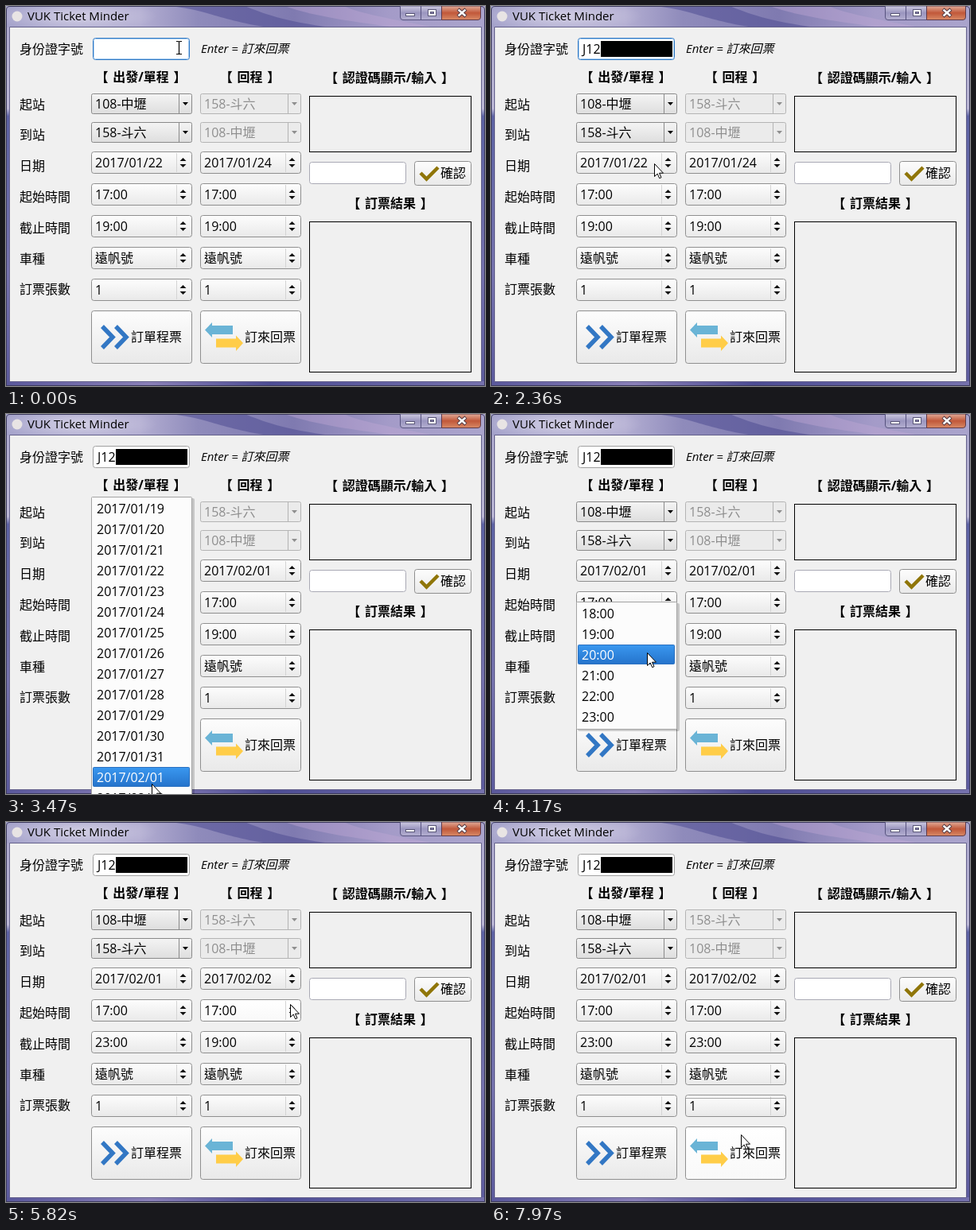
Write an HTML page that moves like this. It is 602x478 px and loops after 7990 ms.

```html
<!DOCTYPE html>
<html lang="zh-TW">
<head>
<meta charset="utf-8">
<title>VUK Ticket Minder</title>
<style>
html, body { margin: 0; width: 100%; height: 100%; overflow: hidden; background: #f0f0f0; }
svg { display: block; width: 602px; height: 478px; }
text { font: 16px "Open Sans", "Noto Sans", "Noto Sans CJK TC", "Noto Sans CJK JP", "Noto Sans CJK SC", "Noto Sans CJK", sans-serif; white-space: pre; }
.head { font-weight: 700; text-anchor: middle; word-spacing: 1.5px; }
.title { font-size: 15px; }
.hint { font-size: 15px; font-style: italic; }
</style>
</head>
<body>
<svg viewBox="0 0 602 478">
  <defs>
    <linearGradient id="bar">
      <stop offset="0" stop-color="#a5a3cb"/><stop offset=".28" stop-color="#b3aed2"/>
      <stop offset=".4" stop-color="#8f8bbb"/><stop offset=".6" stop-color="#7f7ab0"/>
      <stop offset=".8" stop-color="#a49bc8"/><stop offset="1" stop-color="#aaa4cc"/>
    </linearGradient>
    <linearGradient id="edge" x2="0" y2="1">
      <stop offset="0" stop-color="#aaa6cc"/><stop offset=".27" stop-color="#bcb8d6"/>
      <stop offset=".29" stop-color="#5d63a4"/><stop offset=".7" stop-color="#7673ae"/>
      <stop offset="1" stop-color="#5c5b9e"/>
    </linearGradient>
    <linearGradient id="foot">
      <stop offset="0" stop-color="#5a589c"/><stop offset=".3" stop-color="#8a80b8"/>
      <stop offset=".55" stop-color="#4c4c94"/><stop offset="1" stop-color="#7672ae"/>
    </linearGradient>
    <radialGradient id="haze"><stop offset="0" stop-color="#dcd9ea" stop-opacity=".8"/><stop offset="1" stop-color="#dcd9ea" stop-opacity="0"/></radialGradient>
    <linearGradient id="face" x2="0" y2="1"><stop offset="0" stop-color="#fdfdfd"/><stop offset="1" stop-color="#e9e9e9"/></linearGradient>
    <linearGradient id="hover" x2="0" y2="1"><stop offset="0" stop-color="#fff"/><stop offset="1" stop-color="#f9f9f9"/></linearGradient>
    <linearGradient id="drop" x2="0" y2="1"><stop offset="0" stop-color="#f4f4f4"/><stop offset="1" stop-color="#dedede"/></linearGradient>
    <linearGradient id="pick" x2="0" y2="1"><stop offset="0" stop-color="#3a98f0"/><stop offset="1" stop-color="#2573cb"/></linearGradient>
    <linearGradient id="cap" x2="0" y2="1"><stop offset="0" stop-color="#cfcbe2"/><stop offset=".5" stop-color="#9a95bf"/><stop offset="1" stop-color="#b4afd0"/></linearGradient>
    <linearGradient id="close" x2="0" y2="1"><stop offset="0" stop-color="#e2ab98"/><stop offset=".5" stop-color="#c1583a"/><stop offset="1" stop-color="#d88a66"/></linearGradient>
  </defs>
  <g id="base"></g>
  <g id="live"></g>
</svg>
<script>
const LOOP = 7990;
const LEFT = 107, RIGHT = 244;
const TRAIN = '遠帆號';
const $ = id => document.getElementById(id);

const text = (x, y, s, cls = '', fill = '#000') =>
  `<text x="${x}" y="${y + 6}" class="${cls}" fill="${fill}">${s}</text>`;
const box = (x, y, w, h, fill, stroke = 'none', r = 0) => {
  const o = stroke === 'none' ? 0 : .5;
  return `<rect x="${x + o}" y="${y + o}" width="${w - 2 * o}" height="${h - 2 * o}" rx="${r}" fill="${fill}" stroke="${stroke}"/>`;
};
const path = (d, fill, extra = '') => `<path d="${d}" fill="${fill}" ${extra}/>`;
const line = (d, color, w = 1) => path(d, 'none', `stroke="${color}" stroke-width="${w}"`);

// drop-down with a square arrow cell
function station(x, y, s, off) {
  const ink = off ? '#8e8e8e' : '#000', rim = off ? '#b4b4b4' : '#8a8a8a';
  return box(x, y, 127, 26, off ? '#ebebeb' : 'url(#drop)', rim, 2) +
    line(`M${x + 110.5} ${y + 1}v24`, rim) +
    path(`M${x + 115} ${y + 11}h7l-3.5 4z`, ink) + text(x + 5, y + 13, s, '', ink);
}

// drop-down with up and down arrows
function combo(x, y, s, hot) {
  return box(x, y, 127, 28, hot ? 'url(#hover)' : 'url(#face)', '#8f8f8f', 3) +
    line(`M${x + 107.5} ${y + 2}v24`, '#d4d4d4') +
    path(`M${x + 111.5} ${y + 12}h8l-4 -4zM${x + 111.5} ${y + 16}h8l-4 4z`, '#111') +
    text(x + 5, y + 14, s);
}

function button(x, s, icon, hot) {
  return box(x, 383, 127, 67, hot ? 'url(#hover)' : 'url(#face)', '#8f8f8f', 3) + icon + text(x + (x === LEFT ? 50 : 56), 416, s);
}

function frame() {
  return box(0, 0, 602, 478, 'url(#edge)') + box(0, 0, 602, 27, 'url(#bar)') + box(0, 472, 602, 6, 'url(#foot)') +
    path('M205 0C250 4 270 18 330 27H410C350 20 320 8 300 0z', '#4a4890', 'opacity=".5"') +
    path('M350 0C390 14 440 20 490 27H540C480 16 440 8 425 0z', '#c0a9d4', 'opacity=".4"') +
    '<ellipse cx="90" cy="13" rx="100" ry="20" fill="url(#haze)"/>' +
    line('M.5 478V5Q.5 .5 5 .5H597Q601.5 .5 601.5 5V477.5H0', '#3d3b5e') +
    line('M4.5 26.5H597.5V472.5H4.5z', '#65628c') + box(5, 27, 592, 445, '#f0f0f0') +
    '<circle cx="14" cy="13" r="6.5" fill="#e8e4e4"/>' + text(27, 12, 'VUK Ticket Minder', 'title') +
    path('M495.5 0V14Q495.5 17.5 499 17.5H547.5V0z', 'url(#cap)', 'stroke="#57537f"') + line('M521.5 0V17', '#57537f') +
    path('M547.5 0V17.5H593Q596.5 17.5 596.5 14V0z', 'url(#close)', 'stroke="#5f3a4a"') +
    box(502, 9, 12, 4, '#fff', '#5b5878') + box(530, 4, 11, 9, '#fff', '#5b5878') + box(533, 7, 5, 3, '#8984b0', '#5b5878') +
    line('M568 4L578 13M578 4L568 13', '#5b4048', 4.5) + line('M568.6 4.6L577.4 12.4M577.4 4.6L568.6 12.4', '#fff', 2.6);
}

function form() {
  const labels = ['起站', '到站', '日期', '起始時間', '截止時間', '車種', '訂票張數'];
  return text(17, 54, '身份證字號') + labels.map((s, i) => text(17, Math.round(123.6 + i * 38.8), s)).join('') +
    text(245, 53, 'Enter = 訂來回票', 'hint') +
    text(169.5, 89, '【 出發/單程 】', 'head') + text(306.5, 89, '【 回程 】', 'head') +
    text(482, 90, '【 認證碼顯示/輸入 】', 'head') + text(483, 248, '【 訂票結果 】', 'head') +
    station(LEFT, 110, '108-中壢') + station(LEFT, 146, '158-斗六') +
    station(RIGHT, 110, '158-斗六', true) + station(RIGHT, 146, '108-中壢', true) +
    [LEFT, RIGHT].map(x => combo(x, 303, TRAIN) + combo(x, 343, '1')).join('') +
    combo(LEFT, 223, '17:00') +
    box(381, 113, 204, 71, 'none', '#000') + box(381, 271, 204, 190, 'none', '#000') +
    box(381, 196, 122, 28, '#fff', '#a9a9b4', 3) + box(513, 195, 72, 31, 'url(#face)', '#8f8f8f', 3) +
    line('M521 210L528.5 217.5L543 203', '#8f7508', 4.5) + text(546, 210, '確認') +
    button(LEFT, '訂單程票', line('M121 403L134 416.5L121 430M138 403L151 416.5L138 430', '#3277c4', 5.5));
}

const swap = path('M250 407.5L259 398V402H285V413H259V417z', '#6ab4d6') +
  path('M298 424L289 434V429.500H264V418.500H289V414.500z', '#ffcd48');

const day = i => '2017/' + (i < 13 ? '01/' + (19 + i) : '02/0' + (i - 12));
const hour = i => 18 + i + ':00';

// pointer stops: time, x, y
const stops = [
  [0, 217, 52], [1990, 219, 48], [2360, 205, 198], [2460, 205, 198], [2720, 199, 354], [2860, 199, 355],
  [3450, 183, 465], [3610, 183, 466], [3980, 200, 277], [4080, 200, 278], [4390, 180, 384], [4460, 180, 384],
  [4780, 282, 326], [5040, 305, 200], [5170, 308, 203], [5390, 308, 203], [5560, 312, 224], [5630, 313, 225],
  [5820, 357, 229], [6330, 357, 229], [6490, 352, 272], [6570, 352, 274], [6750, 352, 274], [7120, 335, 380],
  [7890, 335, 380], [7970, 314, 393]
];
// open lists: from, to, x, top, rows, first row number, label
const lists = [
  [2400, 3560, LEFT, 104, 17, 0, day], [4020, 4440, LEFT, 236, 6, 0, hour],
  [5080, 5610, RIGHT, 182, 4, 13, day], [6520, 7520, RIGHT, 236, 6, 0, hour]
];
const clicks = [[240, 390], [2370, 2460], [3490, 3570], [3990, 4080], [5060, 5150], [5580, 5640], [6490, 6560]];
const within = (t, a, b) => t >= a && t < b;

function pointer(t) {
  const n = stops.findIndex(s => s[0] > t);
  if (n < 0) return stops[stops.length - 1].slice(1);
  const [t0, x0, y0] = stops[n - 1], [t1, x1, y1] = stops[n];
  if (t1 === 1990) return [x0, y0];
  const u = (t - t0) / (t1 - t0), e = u * u * (3 - 2 * u);
  return [x0 + (x1 - x0) * e, y0 + (y1 - y0) * e].map(Math.round);
}

const rowAt = (top, rows, y) => Math.max(0, Math.min(rows - 1, Math.floor((y - top - 2) / 26)));

function popup([, , x, top, rows, first, label], y) {
  const on = rowAt(top, rows, y), h = rows * 26 + 5;
  let s = box(x + 2, top + 2, 128, h, '#000', 'none', 2).replace('/>', ' opacity=".18"/>') +
    box(x, top, 127, h, '#fcfcfc', '#a3a3a3', 1);
  for (let i = 0; i < rows; i++) {
    const mid = top + 15 + i * 26;
    if (i === on) s += box(x + 2, mid - 13, 122, 25, 'url(#pick)', '#2a70c0', 1);
    s += text(x + 7, mid, label(first + i), '', i === on ? '#fff' : '#000');
  }
  return s;
}

function mouse(t, x, y) {
  if (within(t, 620, 1990)) return '';
  const press = clicks.some(c => within(t, ...c))
    ? `<circle cx="${x - 1}" cy="${y}" r="12" fill="#ff0" opacity=".47"/>` : '';
  if (y < 70) return press + line(`M${x - 3} ${y - 7.5}h2.500q1 0 1 1q0 -1 1 -1h2.500M${x + .5} ${y - 7}v15M${x - 3} ${y + 8.500}h2.500q1 0 1 -1q0 1 1 1h2.500`, '#000', 1.2);
  return press + path('M.5 .5V16.500L4.200 13L6.700 18.700L9 17.700L6.500 12.200H11.500z', '#fff',
    `stroke="#000" transform="translate(${x} ${y})"`);
}

function draw(t) {
  const [x, y] = pointer(t);
  const open = lists.find(l => within(t, l[0], l[1]));
  const back = t < 2760 ? 5 : t < 3560 ? Math.max(5, rowAt(104, 17, y)) : t < 5610 ? 13 : 14;
  const typed = t < 620 ? '' : t < 970 ? 'J' : t < 1065 ? 'J1' : 'J12';
  const focus = t < 2370;
  let s = box(109, 40, 122, 28, '#fff', focus ? '#2f78c4' : '#a0a0a0', 3);
  if (focus) s += box(110, 41, 120, 26, 'none', '#a8cdf0', 2);
  s += text(115, 54, typed);
  if (t >= 1160) s += box(138, 44, 90, 20, '#000');
  s += combo(LEFT, 183, day(t < 3560 ? 3 : 13)) + combo(RIGHT, 183, day(back), within(t, 5010, 5700)) +
    combo(RIGHT, 223, '17:00', within(t, 5740, 6400)) +
    combo(LEFT, 263, t < 4440 ? '19:00' : '23:00') +
    combo(RIGHT, 263, t < 7520 ? '19:00' : '23:00', within(t, 6420, 7520)) +
    button(RIGHT, '訂來回票', swap, t >= 7890);
  if (t >= 7520) s += line('M245 347.5H370', '#a6a6a6');
  if (open) s += popup(open, y);
  $('live').innerHTML = s + mouse(t, x, y);
}

$('base').innerHTML = frame() + form();
const start = performance.now();
function tick() {
  draw((performance.now() - start) % LOOP);
  requestAnimationFrame(tick);
}
tick();
</script>
</body>
</html>
```
